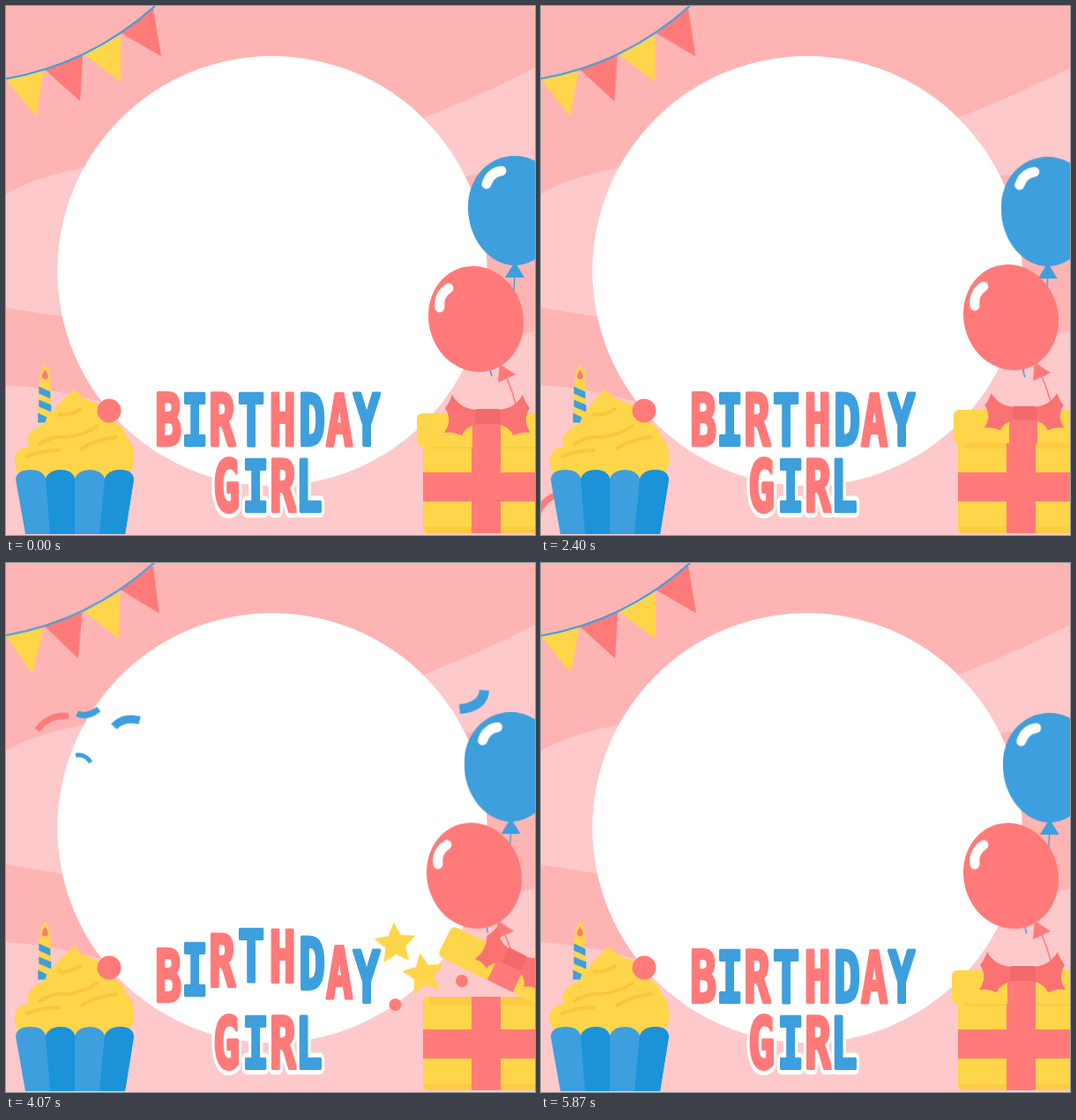
Animation of 600 by 600 pixels, one loop 5.94 s. Source, as an HTML page without scripts:

```html
<!DOCTYPE html>
<html lang="en">
<head>
<meta charset="utf-8">
<title>Birthday Girl</title>
<style>
html, body { margin: 0; width: 100%; height: 100%; overflow: hidden; background: #ffb4b4; }
svg { display: block; width: 100vw; height: 100vh; }
.p { fill: #ff7a79; } .b { fill: #3d9fdd; } .y { fill: #ffd54a; } .d { fill: #fccb42; }
.sp { stroke: #ff7a79; } .sb { stroke: #3d9fdd; } .sw { stroke: #fff; } .sd { stroke: #fac63c; } .sy { stroke: #ffd54a; }
.line { fill: none; }
.round { stroke-linecap: round; stroke-linejoin: round; }
.move, .bit, .l, .flag { animation: 2.97s linear infinite; }

/* lettering */
text { font: 700 81px 'DejaVu Sans Mono', 'Liberation Mono', monospace; text-anchor: middle; vector-effect: non-scaling-stroke; }
.l { stroke-width: 3.4; stroke-linejoin: round; animation-timing-function: ease-in-out; animation-delay: calc(var(--i) * var(--gap)); }
.l.p { stroke: #ff7a79; } .l.b { stroke: #3d9fdd; }
.halo { fill: #fff; stroke: #fff; stroke-width: 12; }
.top { --gap: 51ms; } .top .l { animation-name: hop1; }
.low { --gap: 20ms; } .low .l { animation-name: hop2; }
@keyframes hop1 { 0%, 24.6%, 38.1%, 100% { transform: none; } 31.3% { transform: translateY(-24px); } }
@keyframes hop2 { 0%, 40%, 51.9%, 100% { transform: none; } 46% { transform: translateY(-25px); } }

.flag { animation-name: sway; animation-timing-function: ease-in-out; }
@keyframes sway { 50% { transform: translate(-1px, -.5px) rotate(var(--a, 2deg)); } }

.blue { animation-name: blue; } .pink { animation-name: pink; }
@keyframes blue {
  25% { transform: translate(-3px, -1.5px); } 50% { transform: translate(-6px, 0); }
  75% { transform: translate(-3px, 1.5px); }
}
@keyframes pink {
  25% { transform: translate(-2px, .5px); } 50% { transform: translate(-2px, -1.5px); }
  75% { transform: translate(0, -2.5px); }
}

.tip { transform-origin: 78px 475px; animation-name: tip; }
@keyframes tip {
  0%, 36%, 100% { transform: none; } 48.1% { transform: skewX(9.7deg); }
  53.9% { transform: skewX(19deg); } 80.8% { transform: skewX(8deg); } 97% { transform: skewX(1deg); }
}

.lid { transform-origin: 466px 462px; animation-name: lid; animation-timing-function: ease-in-out; }
@keyframes lid {
  0%, 4.4%, 88%, 100% { transform: none; }
  9% { transform: translate(1px, 3px); }
  18% { transform: translate(42px, -57px) rotate(29deg); }
  22%, 66% { transform: translate(40px, -51px) rotate(26deg); }
  76% { transform: none; }
  80.8% { transform: translate(2px, -4px); }
}
.bow { transform-origin: 546px 466px; animation-name: bow; animation-timing-function: ease-in-out; }
@keyframes bow {
  0%, 4.4%, 88%, 100% { transform: none; }
  18%, 66% { transform: scale(.82, 1.08); }
  80.8% { transform: scale(.93, .92); }
}

.s1 { animation-name: s1; } .s2 { animation-name: s2; } .d1 { animation-name: d1; } .d2 { animation-name: d2; }
@keyframes s1 {
  0%, 11%, 76%, 100% { transform: translate(530px, 510px) scale(0); }
  21%, 26.9% { transform: translate(440px, 434px) rotate(-21deg); }
  48.1% { transform: translate(443px, 430px) rotate(14deg); }
  53.9%, 66% { transform: translate(441px, 430px); }
}
@keyframes s2 {
  0%, 11%, 76%, 100% { transform: translate(530px, 510px) scale(0); }
  21%, 26.9% { transform: translate(475px, 466px) rotate(5deg); }
  48.1% { transform: translate(472px, 467px) rotate(-26deg); }
  53.9%, 66% { transform: translate(471px, 467px) rotate(-28deg); }
}
@keyframes d1 {
  0%, 11%, 76%, 100% { transform: translate(530px, 510px) scale(0); }
  21%, 66% { transform: translate(441.5px, 501px); }
}
@keyframes d2 {
  0%, 11%, 76%, 100% { transform: translate(530px, 510px) scale(0); }
  21%, 66% { transform: translate(517px, 474px); }
}

/* falling paper */
.c1 { animation-name: c1; } .c2 { animation-name: c2; } .c3 { animation-name: c3; }
.c4 { animation-name: c4; } .c5 { animation-name: c5; } .c6 { animation-name: c6; }
@keyframes c1 {
  0%, 16% { transform: translate(25px, -40px) rotate(60deg); }
  25.6% { transform: translate(36px, 75px) rotate(40deg); } 26.9% { transform: translate(47px, 91px) rotate(30deg); }
  48.1% { transform: translate(58px, 278px); } 53.9% { transform: translate(59px, 344px) rotate(3deg); }
  80.8% { transform: translate(4px, 570px) rotate(-15deg); } 90%, 100% { transform: translate(-10px, 650px); }
}
@keyframes c2 {
  0%, 17% { transform: translate(170px, -40px) rotate(90deg); }
  25.6% { transform: translate(153px, 67px) rotate(62deg); } 26.9% { transform: translate(146px, 85px) rotate(45deg); }
  48.1% { transform: translate(127px, 284px) rotate(-24deg); } 53.9% { transform: translate(126px, 357px); }
  80%, 100% { transform: translate(90px, 650px); }
}
@keyframes c3 {
  0%, 13% { transform: translate(70px, -40px) rotate(-50deg); }
  25.6% { transform: translate(77px, 109px) rotate(-12deg); } 26.9% { transform: translate(80px, 129px); }
  48.1% { transform: translate(96px, 321px) rotate(15deg); } 53.9% { transform: translate(94px, 381px) rotate(20deg); }
  80%, 100% { transform: translate(85px, 650px); }
}
@keyframes c4 {
  0%, 27.6% { transform: translate(100px, -40px) rotate(-70deg); }
  48.1% { transform: translate(85px, 413px) rotate(6deg); } 60%, 100% { transform: translate(80px, 650px); }
}
@keyframes c5 {
  0%, 17% { transform: translate(478px, -40px) rotate(-50deg); }
  25.6% { transform: translate(489px, 59px) rotate(-10deg); } 26.9% { transform: translate(495px, 76px) rotate(4deg); }
  48.1% { transform: translate(570px, 245px) rotate(-30deg); } 53.9% { transform: translate(579px, 311px) rotate(-45deg); }
  76%, 100% { transform: translate(560px, 650px) rotate(-120deg); }
}
@keyframes c6 {
  0%, 16% { transform: translate(520px, -40px) rotate(-30deg); }
  25.6% { transform: translate(536px, 68px); } 26.9% { transform: translate(540px, 83px) rotate(-6deg); }
  48.1% { transform: translate(545px, 320px) rotate(70deg); } 53.9% { transform: translate(545px, 370px) rotate(110deg); }
  76%, 100% { transform: translate(550px, 650px) rotate(180deg); }
}

/* curls that draw on and off */
.curl1, .curl2 { stroke-dasharray: 100 300; }
.curl1 { transform-origin: 476px 84px; animation-name: curl1; }
.curl2 { transform-origin: 548px 122px; animation-name: curl2; }
.curl3 { animation-name: curl3; }
@keyframes curl1 {
  0%, 37% { stroke-dashoffset: 112; visibility: hidden; }
  37.1% { stroke-dashoffset: 108; visibility: visible; }
  46%, 48.5% { stroke-dashoffset: 0; transform: none; }
  53.9% { stroke-dashoffset: -90; transform: translate(-4px, 4px) rotate(22deg); visibility: visible; }
  56%, 100% { stroke-dashoffset: -112; visibility: hidden; }
}
@keyframes curl2 {
  0%, 38% { stroke-dashoffset: -112; visibility: hidden; }
  38.1% { stroke-dashoffset: -108; visibility: visible; }
  46%, 48.5% { stroke-dashoffset: 0; transform: none; }
  53.9% { stroke-dashoffset: 74; transform: translate(-11px, -1px) rotate(70deg); visibility: visible; }
  56%, 100% { stroke-dashoffset: 112; visibility: hidden; }
}
@keyframes curl3 {
  0%, 38% { transform: translate(58px, 385px) scale(0); }
  48.1% { transform: translate(40px, 361px); }
  53.9% { transform: translate(29px, 342px) scale(1.17); }
  60%, 100% { transform: translate(18px, 328px) scale(0); }
}
</style>
</head>
<body>
<svg viewBox="0 0 600 600" role="img" aria-label="Birthday Girl">
  <defs>
    <path id="star" d="M0-23 6.5-8.9 21.9-7.1 10.5 3.4 13.5 18.6 0 11-13.5 18.6-10.5 3.4-21.9-7.1-6.5-8.9Z"/>
    <path id="wing" d="M506 441Q515 457 534 458V474Q520 478 517 487 506 482 497 484 507 470 498 456 503 450 506 441Z"/>
  </defs>

  <path fill="#ffb4b4" d="M0 0H600V600H0Z"/>
  <path fill="#fdc9cb" d="M0 213Q30 195 90 183C250 180 350 180 472 127Q540 101 600 70V187Q550 187 510 195C350 240 250 390 62 352Q30 347 0 342Z"/>
  <path fill="#fdc9cb" d="M0 430Q50 433 100 447C250 480 430 440 520 395Q560 377 600 369V600H0Z"/>
  <circle cx="302" cy="300.5" r="243.7" fill="#fff"/>

  <g class="top">
    <g class="l p" style="--i:0"><text transform="translate(184 498) scale(.62 1)">B</text></g>
    <g class="l b" style="--i:1"><text transform="translate(214 498) scale(.62 1)">I</text></g>
    <g class="l p" style="--i:2"><text transform="translate(245 498) scale(.62 1)">R</text></g>
    <g class="l b" style="--i:3"><text transform="translate(278 498) scale(.62 1)">T</text></g>
    <g class="l p" style="--i:4"><text transform="translate(313.5 498) scale(.62 1)">H</text></g>
    <g class="l b" style="--i:5"><text transform="translate(347 498) scale(.62 1)">D</text></g>
    <g class="l p" style="--i:6"><text transform="translate(378 498) scale(.62 1)">A</text></g>
    <g class="l b" style="--i:7"><text transform="translate(409 498) scale(.62 1)">Y</text></g>
  </g>
  <g class="low">
    <g class="l p" style="--i:0"><use href="#g" class="halo"/><text id="g" transform="translate(250 573) scale(.62 1)">G</text></g>
    <g class="l b" style="--i:1"><use href="#i" class="halo"/><text id="i" transform="translate(283 573) scale(.62 1)">I</text></g>
    <g class="l p" style="--i:2"><use href="#r" class="halo"/><text id="r" transform="translate(314 573) scale(.62 1)">R</text></g>
    <g class="l b" style="--i:3"><use href="#l" class="halo"/><text id="l" transform="translate(343.5 573) scale(.62 1)">L</text></g>
  </g>

  <g class="line">
    <path class="bit c1 sp" stroke-width="7" d="M-14 13Q-6-8 16-12"/>
    <path class="bit c2 sb" stroke-width="9" d="M-13 8Q-5-6 14-5"/>
    <path class="bit c3 sb" stroke-width="5" d="M-9-2Q2-5 9 4"/>
    <path class="bit c4 sb" stroke-width="7" d="M-11-6Q-5 5 12 4"/>
    <path class="bit c5 sb" stroke-width="11" d="M-18 5Q9 8 14-10"/>
    <path class="bit c6 sb" stroke-width="7" d="M-9 7Q-5-4 10-5"/>
    <g class="round">
      <path class="bit curl1 sp" pathLength="100" stroke-width="7" d="M471 47C474 61 460 66 454 59 448 49 457 42 468 46 484 51 486 70 478 84"/>
      <path class="bit curl2 sw" pathLength="100" stroke-width="3" d="M542 127C552 122 560 125 558 117 556 111 548 115 552 122 556 130 570 128 576 120"/>
      <path class="bit curl3 sw" stroke-width="3.4" d="M-7-15C-19-4-14 14-2 15 14 15 16 1 7 1-1 2-3 10 3 15"/>
    </g>
  </g>

  <!-- bunting -->
  <path class="flag y" style="transform-origin:20px 78px;--a:5deg" d="M0 83 43 73 34 125Z"/>
  <path class="flag p" style="transform-origin:66px 65px" d="M44 72 87 56 84 108Z"/>
  <path class="flag y" style="transform-origin:110px 44px" d="M88 55 130 33V86Z"/>
  <path class="flag p" style="transform-origin:150px 18px" d="M131 31 167 3 176 57Z"/>
  <path class="flag line sb" style="--a:0deg" stroke-width="2.2" d="M0 82.5Q95 66 169 0"/>

  <!-- balloons -->
  <g class="move blue">
    <path class="line sb" stroke-width="1.5" d="M577 305Q575 370 549 412L551 420"/>
    <path class="b" d="M577 290 588 308H566Z"/>
    <path class="b" d="M577 170C608 170 630 197 630 229 630 264 606 294 577 294 548 294 524 264 524 228 524 196 546 170 577 170Z"/>
    <path class="line sw round" stroke-width="11" d="M545 202Q549 189 562 187"/>
  </g>
  <g class="move pink">
    <path class="line sp" stroke-width="1.5" d="M567 420Q575 438 579 455"/>
    <path class="p" d="M560 406 578 418 558 427Z"/>
    <ellipse class="p" cx="533" cy="355" rx="53.5" ry="60.5" transform="rotate(-15 533 355)"/>
    <path class="line sw round" stroke-width="11" d="M492 342Q490 328 502 320"/>
  </g>

  <!-- gift -->
  <use href="#star" class="move s1 y sy round" stroke-width="1.6"/>
  <use href="#star" class="move s2 y sy round" stroke-width="1.6"/>
  <circle class="move d1 p" r="7"/>
  <circle class="move d2 p" r="7"/>
  <path class="y" d="M473 492H600V598H477Q473 598 473 594Z"/>
  <path class="d" d="M480 492H600V502H480ZM474 591H600V598H477Z"/>
  <path class="p" d="M528 492H561V598H528ZM473 529H600V562H473Z"/>
  <g class="move lid">
    <rect class="y" x="466" y="462" width="158" height="38" rx="6"/>
    <path class="p" d="M529 460H561V500H529Z"/>
    <g class="move bow" fill="#fa7272">
      <use href="#wing"/>
      <use href="#wing" transform="matrix(-1 0 0 1 1092 0)"/>
      <rect x="532" y="457" width="29" height="17" rx="3" fill="#f26a6b"/>
    </g>
  </g>

  <!-- cupcake -->
  <path class="tip move y" d="M78 434Q85 446 104 451 116 458 112 480L42 484Q36 479 47 470 52 459 64 447Q71 441 78 434Z"/>
  <path class="y" d="M30 482Q36 475 50 473L110 468Q134 473 136 488 147 498 145 518 143 530 128 540H24Q8 528 10 513 12 501 26 500 21 489 30 482Z"/>
  <g class="line round sd" stroke-width="4">
    <path d="M60 463Q70 466 84 457M38 497Q50 488 66 489 88 488 104 476M86 502Q100 492 125 489M24 511Q40 504 60 504"/>
  </g>
  <circle class="p" cx="117" cy="459" r="13.5"/>
  <g transform="translate(.3 1.5)">
    <path class="y" d="M37 424 50 422 51 466 44 471H36Z"/>
    <path class="b" d="M37 430 50 436V444L37 438ZM37 445 51 451V459L37 453ZM36 460 46 465 44 471H36Z"/>
    <path class="y" d="M44 405Q50 413 50 418 49 424 44 424 38 424 38 418 39 412 44 405Z"/>
    <path class="p" d="M44 411Q51 421 44 422 37 421 44 411Z"/>
  </g>
  <path class="b" d="M11 537Q12 526 28 526 42 526 45 536 49 526 62 526 75 526 78 536 82 526 95 526 108 526 112 536 116 526 129 526 144 526 145 537L135 599H22Z"/>
  <path fill="#1a93d9" d="M45 536Q49 526 62 526 75 526 78 536V599H50ZM112 536Q116 526 129 526 144 526 145 537L135 599H106Z"/>
</svg>
</body>
</html>
```
